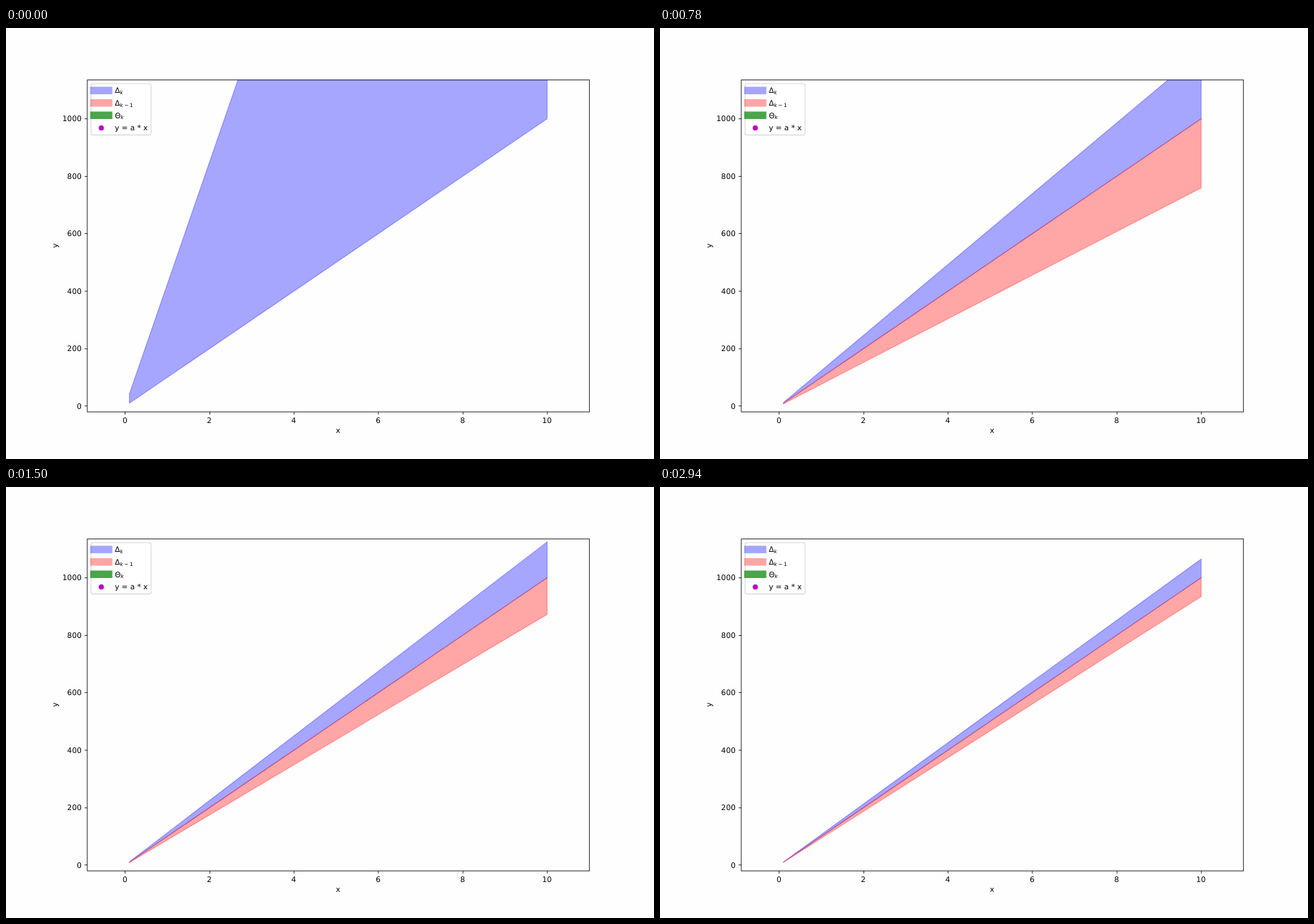
Animation, 917 px wide and 611 px high, one loop 2970 ms. Source, as an HTML page:

```html
<!DOCTYPE html>
<html lang="en">
<head>
<meta charset="utf-8">
<title>Interval estimates</title>
<style>
html, body { margin: 0; width: 100%; height: 100%; overflow: hidden; background: #fefefe; }
svg { display: block; }
text { font: 13.89px "DejaVu Sans", sans-serif; text-rendering: geometricPrecision; }
.sub { font-size: 9.72px; }
.it { font-style: italic; }
.num text { letter-spacing: .16px; }
.band { stroke-width: 1.39; fill-opacity: .35; stroke-opacity: .35; }
</style>
</head>
<body>
<svg width="917" height="611" viewBox="0 0 1200 800" preserveAspectRatio="none">
  <clipPath id="area"><rect x="150" y="96" width="930" height="616"/></clipPath>
  <g clip-path="url(#area)">
    <g transform="translate(.4 .4)">
      <polygon id="now" class="band" fill="#00f" stroke="#00f"/>
      <polygon id="before" class="band" fill="#f00" stroke="#f00"/>
    </g>
  </g>
  <rect x="150.5" y="96.5" width="930" height="616" fill="none" stroke="#000" stroke-width="1.11"/>
  <g id="axes" class="num"></g>
  <text x="615" y="751.5" text-anchor="middle">x</text>
  <text transform="translate(95.5 404) rotate(-90)" text-anchor="middle">y</text>

  <rect x="157.5" y="103.5" width="111" height="95" rx="2.8" fill="#fff" fill-opacity=".8" stroke="#ccc" stroke-opacity=".8" stroke-width="1.39"/>
  <g stroke-width="13.89">
    <path d="M156 116H197" stroke="#00f" opacity=".35"/>
    <path d="M156 139H197" stroke="#f00" opacity=".35"/>
    <path d="M156 162H197" stroke="#008000" opacity=".7"/>
  </g>
  <circle cx="176.5" cy="185.5" r="4.8" fill="#bf00bf"/>
  <text x="201.4" y="121">Δ</text><text x="211" y="123.2" class="sub it">k</text>
  <text x="201.4" y="144">Δ</text><text x="211" y="146.2" class="sub it">k</text>
  <text x="218.8" y="146.2" class="sub">−</text><text x="228.9" y="146.2" class="sub">1</text>
  <text x="201.4" y="167">Θ</text><text x="212.4" y="169.2" class="sub it">k</text>
  <text x="201.4" y="190">y = a * x</text>
</svg>
<script>
const FRAME = 30, COUNT = 99, A = 100;
const px = x => 150 + (x + 0.9) * 930 / 11.9;
const py = y => 712 - (y + 20) * 616 / 1155;
const snap = v => Math.round(v) + 0.5;
const el = id => document.getElementById(id);

let marks = '';
for (let i = 0; i < 6; i++) {
  const x = px(2 * i), y = py(200 * i);
  marks += `<path d="M${snap(x)} 712.5v4.9M150.5 ${snap(y)}h-4.9" stroke="#000" stroke-width="1.11"/>
    <text x="${x}" y="732.6" text-anchor="middle">${2 * i}</text>
    <text x="140.3" y="${y + 5.2}" text-anchor="end">${200 * i}</text>`;
}
el('axes').innerHTML = marks;

// Slopes allowed by measurement k: bounded by A, error sign alternates.
function band(k) {
  if (k < 0) return '';
  const edge = A + (k % 2 ? -1 : 1) * 650 / (k + 2);
  return [[0.1, A], [10, A], [10, edge], [0.1, edge]]
    .map(([x, slope]) => px(x) + ',' + py(x * slope)).join(' ');
}

const start = performance.now();
function draw() {
  const k = Math.floor((performance.now() - start) / FRAME) % COUNT;
  el('now').setAttribute('points', band(k));
  el('before').setAttribute('points', band(k - 1));
  requestAnimationFrame(draw);
}
draw();
</script>
</body>
</html>
```
